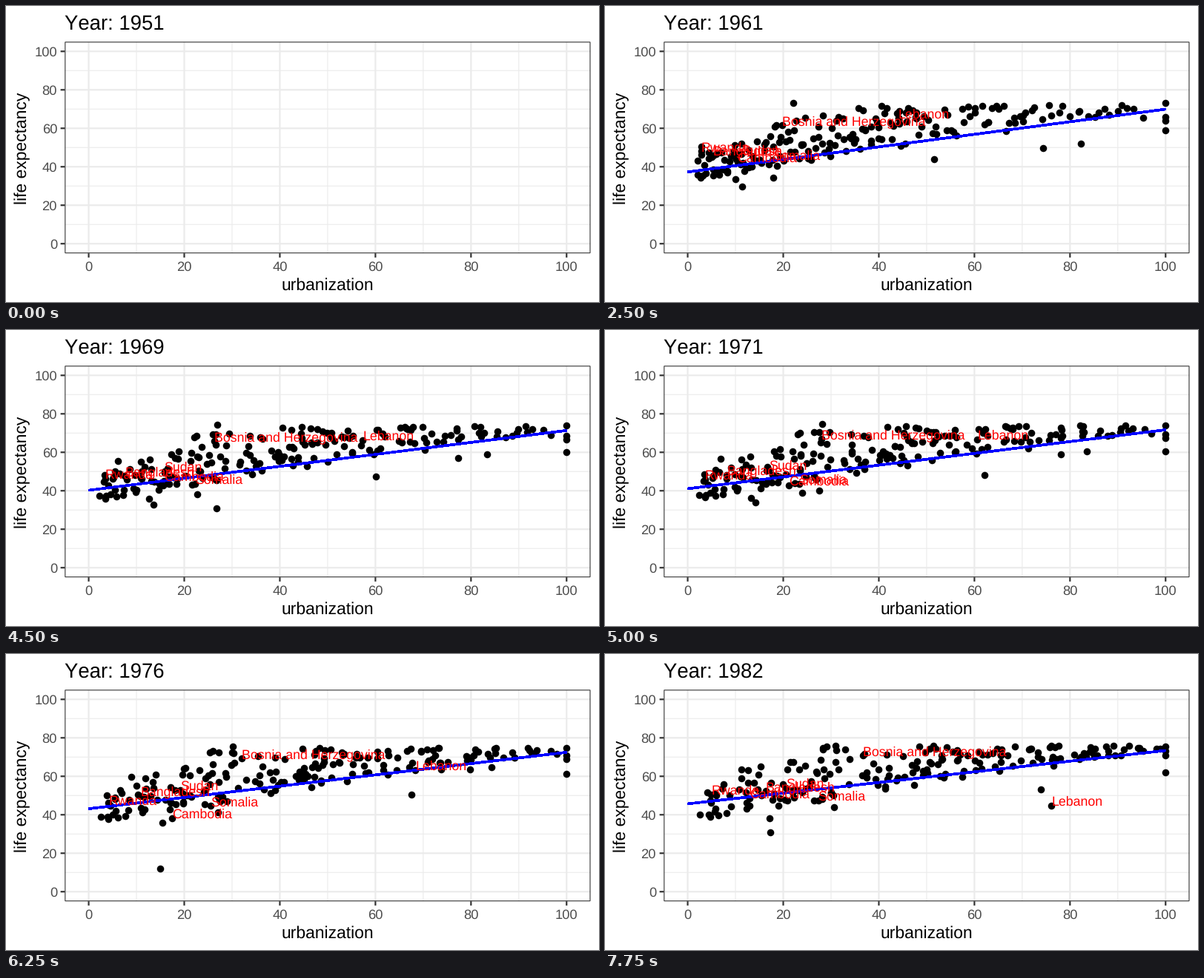
A matplotlib script that plays this animation: 800x400 px, repeating every 8000 ms.

```python
import numpy as np
import matplotlib.pyplot as plt
from matplotlib.animation import FuncAnimation
from matplotlib.patches import Rectangle

plt.rcParams["font.family"] = "Liberation Sans"
plt.rcParams["text.hinting"] = "none"
plt.rcParams["text.kerning_factor"] = 12     # rounds all kerning to zero

W, H, DPI = 800, 400, 100
PX = 72 / DPI                                # points per pixel
LEFT, RIGHT, TOP, BOTTOM = 79.3, 788.5, 48.3, 334.2
FIRST_YEAR, DATA_YEAR, FRAMES = 1951, 1960, 32
LAST_YEAR = FIRST_YEAR + FRAMES - 1

# Turning points of single countries: (year, urbanization, life expectancy)
NAMED = {
    "Rwanda": [(1961, 2.8, 48), (1974, 3.9, 45.1), (1978, 4.6, 45.1),
               (1982, 4.9, 50.5)],
    "Bangladesh": [(1961, 5.3, 46), (1974, 9, 49), (1982, 16.3, 52.4)],
    "Sudan": [(1961, 11.2, 46.5), (1974, 18.7, 52.4), (1982, 20.5, 54)],
    "Cambodia": [(1961, 10.4, 42.4), (1969, 15.8, 45.1), (1974, 29.3, 39.7),
                 (1978, 5.6, 36.7), (1982, 13, 48.6)],
    "Somalia": [(1961, 17.8, 43.6), (1974, 25, 43.6), (1982, 27.3, 47.4)],
    "Bosnia and Herzegovina": [(1961, 19.7, 61.7), (1974, 30.4, 68.6),
                               (1982, 36.6, 70.9)],
    "Lebanon": [(1961, 44.1, 65.1), (1974, 65.6, 67), (1978, 71.1, 59.3),
                (1982, 76.1, 44.9)],
}
UNNAMED = [
    [(1961, 10, 33.5), (1974, 14.2, 37.2), (1976, 15, 12), (1982, 17.3, 30.8)],
    [(1966, 25.7, 45), (1968, 26.5, 26), (1972, 27.8, 45), (1982, 30.5, 50)],
    [(1961, 22.1, 73), (1974, 29.9, 75.2), (1982, 31, 75.8)],
    [(1961, 11.4, 29.8), (1982, 17.1, 38.1)],
    [(1961, 51.5, 43.8), (1982, 73.9, 53)],
    [(1961, 74.4, 49.7), (1982, 82, 69)],
    [(1961, 82.3, 52), (1982, 85, 70)],
    [(1961, 17.9, 34.4), (1982, 30.7, 44)],
    [(1961, 2.1, 43.2), (1982, 4.8, 47.5)],
    [(1961, 2.9, 50.5), (1982, 11.3, 63.6)],
    [(1961, 100, 58.8), (1982, 100, 62)],
    [(1961, 100, 64), (1982, 100, 71)],
    [(1961, 100, 66), (1982, 100, 73)],
    [(1961, 100, 73), (1982, 100, 75.3)],
    [(1961, 95.3, 65.6), (1982, 98.9, 74.3)],
]

# All other countries: a seeded cloud, dense among the rural ones
N = 178
rng = np.random.default_rng(12)
rank = (np.arange(N) + rng.random(N)) / N
u_start = np.interp(rank, [0, .3, .7, .9, 1], [2, 20, 48, 72, 94])
share = u_start / 100
u_gain = 45 * share * (1 - share) * rng.uniform(.2, 1.8, N)
level = rng.random(N) ** (1.3 - share)


def cloud(s):
    """Points between a rising floor and a rising, saturating ceiling."""
    u = np.minimum(u_start + s * u_gain, 100)
    p = u / 100
    low = 32 + 45 * p - 9 * p ** 2 + 4 * s
    high = 72 + 4 * s - 25 * np.exp(-(p / (.2 - .06 * s)) ** 2)
    return np.column_stack([u, low + level * (high - low)])


def track(year, keys):
    years, us, lives = zip(*keys)
    return np.interp(year, years, us), np.interp(year, years, lives)


def px(u):
    return LEFT + (np.asarray(u) + 5) * (RIGHT - LEFT) / 110


def py(life):
    return BOTTOM - (np.asarray(life) + 5) * (BOTTOM - TOP) / 110


fig = plt.figure(figsize=(W / DPI, H / DPI), dpi=DPI, facecolor="white")
ax = fig.add_axes([0, 0, 1, 1])
ax.set_xlim(0, W)
ax.set_ylim(H, 0)
ax.axis("off")


def line(xs, ys, color, width, z):
    return ax.plot(xs, ys, color=color, lw=width * PX, zorder=z, snap=False,
                   solid_capstyle="butt")[0]


def text(x, y, s, size, color="black", **kw):
    return ax.text(x, y, s, fontsize=size * PX, color=color,
                   va="baseline", **kw)


for v in range(0, 101, 10):
    major = v % 20 == 0
    width, z = (2.2, 1.5) if major else (1.1, 1)
    x, y = px(v), py(v)
    line([x, x], [TOP, BOTTOM], "#ebebeb", width, z)
    line([LEFT, RIGHT], [y, y], "#ebebeb", width, z)
    if major:
        line([x, x], [BOTTOM, BOTTOM + 5.7], "#333333", 2.2, 2)
        line([LEFT - 5.7, LEFT], [y, y], "#333333", 2.2, 2)
        text(x, 358, str(v), 18.33, "#4d4d4d", ha="center")
        text(69, y + 6.6, str(v), 18.33, "#4d4d4d", ha="right")

ax.add_patch(Rectangle((LEFT + .5, TOP + .5), RIGHT - LEFT - 1,
                       BOTTOM - TOP - 1, fill=False, ec="#333333",
                       lw=1.1 * PX, zorder=6, snap=False))
text((LEFT + RIGHT) / 2, 383.8, "urbanization", 22.9, ha="center")
text(28, (TOP + BOTTOM) / 2 + .8, "life expectancy", 22.9, ha="center",
     rotation=90, rotation_mode="anchor")

title = text(LEFT, 32, "", 27.5)
dots = ax.scatter([], [], s=(9.6 * PX) ** 2, c="black", linewidths=0, zorder=3)
trend = line([], [], "#0000ff", 2.7, 4)
trend.set_antialiased(False)
labels = {name: text(0, 0, name, 17.8, "red", zorder=5) for name in NAMED}


def draw(i):
    year = FIRST_YEAR + i
    title.set_text(f"Year: {year}")
    shown = year >= DATA_YEAR
    for artist in (dots, trend, *labels.values()):
        artist.set_visible(shown)
    if not shown:
        return

    s = (year - DATA_YEAR) / (LAST_YEAR - DATA_YEAR)
    named = {name: track(year, keys) for name, keys in NAMED.items()}
    unnamed = [track(year, keys) for keys in UNNAMED]
    u, life = np.vstack([cloud(s), list(named.values()), unnamed]).T
    dots.set_offsets(np.column_stack([px(u), py(life)]))
    for name, (u, life) in named.items():
        labels[name].set_position((px(u), py(life)))
    trend.set_data(px([0, 100]),
                   py([37 + 8.7 * s ** 1.1, 69.7 + 3.7 * s ** .9]))


anim = FuncAnimation(fig, draw, frames=FRAMES, interval=250, repeat=True,
                     repeat_delay=0, init_func=lambda: draw(0))
plt.show()
```
